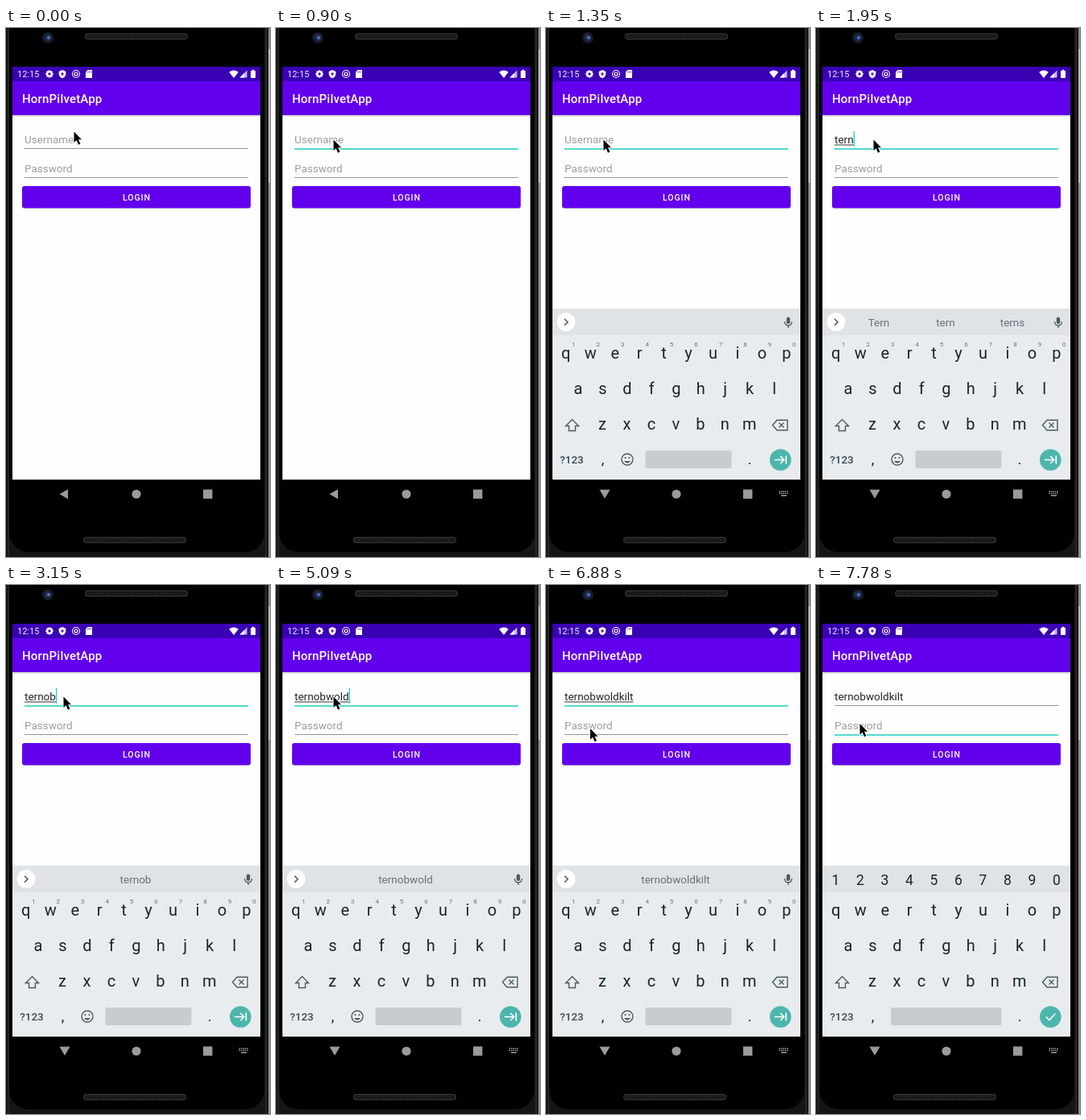
Animation, 328 px wide and 656 px high, one loop 8000 ms. Source, as an HTML page with a canvas:

```html
<!DOCTYPE html>
<html lang="en">
<head>
<meta charset="utf-8">
<title>Login demo</title>
<style>
html, body { margin: 0; width: 100%; height: 100%; overflow: hidden; background: #000; }
canvas { display: block; width: 328px; height: 656px; }
</style>
</head>
<body>
<canvas id="stage"></canvas>
<script>
const W = 328, H = 656, LOOP = 8000;
const APP = 'HornPilvetApp', USER = 'ternobwoldkilt';
const PURPLE = '#6200ee', TEAL = '#2ad0c4', INK = '#17262d', ICON = '#4c5a61';
const FONT = 'Roboto, sans-serif';

const canvas = document.getElementById('stage');
const ctx = canvas.getContext('2d');
const ratio = window.devicePixelRatio || 1;
canvas.width = W * ratio;
canvas.height = H * ratio;

// Each entry overrides part of the state from its time on.
const timeline = [
  [0, { mouse: [84.5, 128.5], focus: '', caret: false, keys: '', typed: 0, composing: true }],
  [300, { mouse: [78, 133] }],
  [450, { mouse: [71.5, 138.5] }],
  [600, { focus: 'user', caret: true }],
  [900, { caret: false }],
  [1200, { keys: 'rising' }],
  [1350, { keys: 'text' }],
  [1500, { typed: 1, caret: true }],
  [1650, { typed: 2 }],
  [1800, { typed: 3 }],
  [1950, { typed: 4 }],
  [2400, { caret: false }],
  [2850, { caret: true }],
  [3000, { typed: 5 }],
  [3150, { typed: 6 }],
  [3440, { typed: 7 }],
  [3740, { typed: 8 }],
  [3890, { typed: 9 }],
  [4040, { typed: 10 }],
  [4490, { caret: false }],
  [5090, { caret: true }],
  [5240, { typed: 11 }],
  [5390, { typed: 12 }],
  [5540, { typed: 13 }],
  [5840, { typed: 14 }],
  [6290, { caret: false, mouse: [69, 147] }],
  [6440, { mouse: [62, 168] }],
  [6590, { mouse: [57, 182] }],
  [6740, { mouse: [55, 178] }],
  [6890, { mouse: [54.5, 172] }],
  [7030, { focus: 'pass' }],
  [7330, { caret: true, composing: false, keys: 'pass' }],
  [7780, { caret: false }]
];
const sideWords = [[], ['to', 'the'], ['tea', 'ten'], ['term', 'terms'], ['Tern', 'terns']];

function stateAt(time) {
  const state = {};
  for (const [start, change] of timeline) if (start <= time) Object.assign(state, change);
  return state;
}

function rect(x, y, w, h, color) {
  ctx.fillStyle = color;
  ctx.fillRect(x, y, w, h);
}

function round(x, y, w, h, r, color) {
  ctx.beginPath();
  ctx.roundRect(x, y, w, h, r);
  ctx.fillStyle = color;
  ctx.fill();
}

function disc(x, y, r, color) {
  ctx.beginPath();
  ctx.arc(x, y, r, 0, Math.PI * 2);
  ctx.fillStyle = color;
  ctx.fill();
}

function ring(x, y, r, color, width) {
  ctx.beginPath();
  ctx.arc(x, y, r, 0, Math.PI * 2);
  ctx.strokeStyle = color;
  ctx.lineWidth = width;
  ctx.stroke();
}

// Path data is relative to the given point.
function shape(x, y, data, fill, stroke, width = 1) {
  const path = new Path2D(data);
  ctx.save();
  ctx.translate(x, y);
  if (fill) { ctx.fillStyle = fill; ctx.fill(path); }
  if (stroke) { ctx.strokeStyle = stroke; ctx.lineWidth = width; ctx.stroke(path); }
  ctx.restore();
}

function text(str, x, y, size, color, { align = 'left', weight = 400, spacing = 0 } = {}) {
  ctx.font = `${weight} ${size}px ${FONT}`;
  ctx.letterSpacing = spacing + 'px';
  ctx.textAlign = align;
  ctx.fillStyle = color;
  ctx.fillText(str, x, y);
  const width = ctx.measureText(str).width;
  ctx.letterSpacing = '0px';
  return width;
}

const centered = (str, x, y, size, color, weight) => text(str, x, y, size, color, { align: 'center', weight });

function drawSpeaker(x, y) {
  round(x, y, 128, 8, 4, '#303030');
  round(x + 1.5, y + 1.5, 125, 5, 2.5, '#171717');
  for (let i = 4; i < 124; i += 3) rect(x + i, y + 3, 1, 2, '#2b2b2b');
}

function drawPhone() {
  rect(0, 0, W, H, '#151515');
  rect(2, 0, 2, H, '#252525');
  round(4, -30, 317, 680, 24, '#000');
  rect(322, 0, 2, H, '#262626');
  rect(326, 0, 2, H, '#8b8b8b');
  rect(326, 26, 2, 166, '#b9b9b9');
  disc(52, 12, 7, '#161a22');
  disc(52, 12, 4.5, '#1d2b50');
  disc(53, 12, 2, '#5570b4');
  drawSpeaker(98, 6.5);
  drawSpeaker(96, 631);
}

function drawStatusBar() {
  rect(8, 48, 308, 18, '#3a00b4');
  text('12:15', 14, 61, 11, '#eee8fa');
  for (let i = 0; i < 8; i++) {
    const a = i * Math.PI / 4;
    disc(54 + 3.6 * Math.cos(a), 57 + 3.6 * Math.sin(a), 1.2, '#fff');
  }
  ring(54, 57, 2.7, '#fff', 2);
  shape(70, 57, 'M0-5L4.3-3V0Q4 4 0 5.3Q-4 4-4.3 0V-3Z', '#fff');
  shape(70, 57, 'M0-2V2M-2 0H2', null, '#3a00b4', 1.2);
  ring(87, 57, 4.5, '#fff', 1.1);
  ring(87, 57, 2, '#fff', 1.2);
  shape(103, 57, 'M-1.5-5H4V5H-4V-2.5Z', '#fff');
  for (const x of [101.4, 103.2, 105]) rect(x, 53.5, 0.8, 2, '#3a00b4');
  shape(283, 57, 'M0 5L-5.8-2.2Q0-6.8 5.8-2.2Z', '#fff');
  shape(295, 57, 'M4.5-4.5V4.5H-4.5Z', '#c9b8ec');
  shape(295, 57, 'M1-1V4.5H-4.5Z', '#fff');
  rect(305.7, 51.8, 2.6, 2, '#fff');
  round(304, 53, 6, 9, 0.8, '#fff');
}

function drawField(y, hint, value, focused, caret, composing) {
  const width = text(value || hint, 23, y, 13.5, value ? '#242424' : '#9d9d9d');
  const end = 23 + (value ? width : 0);
  if (value && composing) rect(23, y + 1.5, width, 1, '#333');
  if (focused) rect(23, y + 6.2, 278, 1.6, TEAL);
  else rect(23, y + 6, 278, 1, '#969696');
  if (caret) rect(end, y - 15, 1.4, 19, TEAL);
}

function drawApp(s) {
  rect(8, 48, 308, 512, '#fefefe');
  const shade = ctx.createLinearGradient(0, 108, 0, 111);
  shade.addColorStop(0, '#c9c9c9');
  shade.addColorStop(1, '#fefefe');
  rect(8, 108, 308, 3, shade);
  drawStatusBar();
  rect(8, 66, 308, 42, PURPLE);
  text(APP, 20, 93, 15, '#fff', { weight: 500, spacing: 0.19 });
  // The caret stays in the first field until the second keyboard appears.
  const inPass = s.keys === 'pass';
  drawField(143, 'Username', USER.slice(0, s.typed), s.focus === 'user', s.caret && !inPass, s.composing);
  drawField(179, 'Password', '', s.focus === 'pass', s.caret && inPass, false);
  round(20, 197, 284, 27.3, 3, '#c9bfd8');
  round(20, 196, 284, 27.3, 3, PURPLE);
  text('LOGIN', 162.4, 214, 10.5, '#fff', { align: 'center', weight: 500, spacing: 0.94 });
}

function drawStrip(s) {
  rect(8, 348, 308, 33, '#dfe3e6');
  if (s.keys === 'pass') {
    [...'1234567890'].forEach((d, i) => centered(d, 24.5 + i * 30.5, 372, 17.5, INK));
    return;
  }
  disc(25, 365.5, 11.8, '#cfd4d7');
  disc(25, 364.8, 11.6, '#fff');
  shape(25, 364.8, 'M-2-4L2 0L-2 4', null, ICON, 1.6);
  round(298.8, 358.5, 4.4, 8.5, 2.2, ICON);
  shape(301, 365, 'M-4.5-1Q-4.2 4 0 4Q4.2 4 4.5-1M0 4V7', null, ICON, 1.3);
  if (s.typed) {
    const gray = '#66717a';
    centered(USER.slice(0, s.typed), 161, 370, 13.5, gray);
    (sideWords[s.typed] || []).forEach((word, i) => centered(word, i ? 244 : 78, 370, 13.5, gray));
  }
}

function drawKeyboard(s) {
  const pass = s.keys === 'pass';
  rect(8, 381, 308, 179, '#e8ecef');
  drawStrip(s);
  const rows = [['qwertyuiop', 24.8, 410], ['asdfghjkl', 40, 454], ['zxcvbnm', 70, 498]];
  for (const [letters, x, y] of rows) {
    [...letters].forEach((c, i) => centered(c, x + i * 30.45, y, 20, INK));
  }
  if (!pass) [...'1234567890'].forEach((d, i) => centered(d, 34.3 + i * 30.45, 395, 8, '#67737a'));

  shape(32.5, 492.5, 'M0-7L8 1H4V7H-4V1H-8Z', null, ICON, 1.4);
  shape(291, 492.5, 'M-9.5 0L-4-6.3H9V6.3H-4Z', null, ICON, 1.4);
  shape(292.5, 492.5, 'M-3-3L3 3M3-3L-3 3', null, ICON, 1.4);

  centered('?123', 32, 540, 13.5, '#3b4a52', 500);
  centered(',', 70.5, 541, 18, INK);
  centered('.', 253, 541, 18, INK);
  const left = pass ? 93 : 123.5;
  round(left, 524, 230.5 - left, 22, 2, '#c7ccd0');
  if (!pass) {
    ring(101, 535, 7, ICON, 1.4);
    disc(98.5, 533, 1.1, ICON);
    disc(103.5, 533, 1.1, ICON);
    shape(101, 536, 'M-4 1Q0 6 4 1Z', ICON);
  }
  disc(291.3, 535.5, 13.3, '#4db6ac');
  const arrow = pass ? 'M-5.5 0L-1.5 4L6-4' : 'M-7.5 0H4M0-4.5L4.5 0L0 4.5M7-5V5';
  shape(291.3, 535.5, arrow, null, '#fff', 1.6);
}

function drawNav(open) {
  const gray = open === 'rising' ? '#c6c6c6' : '#9b9b9b';
  if (open) shape(73, 577.5, 'M-6.5-5H6.5L0 6Z', gray);
  else shape(72, 578, 'M-5.5 0L5-6V6Z', gray);
  disc(162, 578, 5.6, gray);
  rect(245, 572.3, 11.4, 11.4, gray);
  if (!open) return;
  for (let row = 0; row < 2; row++) {
    for (let i = 0; i < 5; i++) rect(289.5 + i * 2.4, 574 + row * 2.4, 1.5, 1.5, gray);
  }
  rect(292, 579, 7, 1.5, gray);
}

function drawMouse([x, y]) {
  const arrow = 'M0 0V13.5L3.1 10.7L5.5 16.2L7.9 15.1L5.5 9.8H9.5Z';
  ctx.lineJoin = 'round';
  shape(x, y, arrow, null, '#fff', 1.8);
  shape(x, y, arrow, '#000');
  ctx.lineJoin = 'miter';
}

function drawRisingKeyboard(s) {
  ctx.save();
  ctx.beginPath();
  ctx.rect(8, 348, 308, 248);
  ctx.clip();
  rect(8, 560, 308, 36, '#fefefe');
  ctx.globalAlpha = 0.5;
  ctx.translate(0, 53);
  drawKeyboard(s);
  ctx.restore();
  rect(8, 560, 308, 36, 'rgba(0,0,0,.52)');
}

function draw(now) {
  const s = stateAt(now % LOOP);
  ctx.setTransform(ratio, 0, 0, ratio, 0, 0);
  drawPhone();
  drawApp(s);
  if (s.keys === 'rising') drawRisingKeyboard(s);
  else if (s.keys) drawKeyboard(s);
  drawNav(s.keys);
  drawMouse(s.mouse);
}

const begin = performance.now();
function tick() {
  draw(performance.now() - begin);
  requestAnimationFrame(tick);
}
tick();
</script>
</body>
</html>
```
